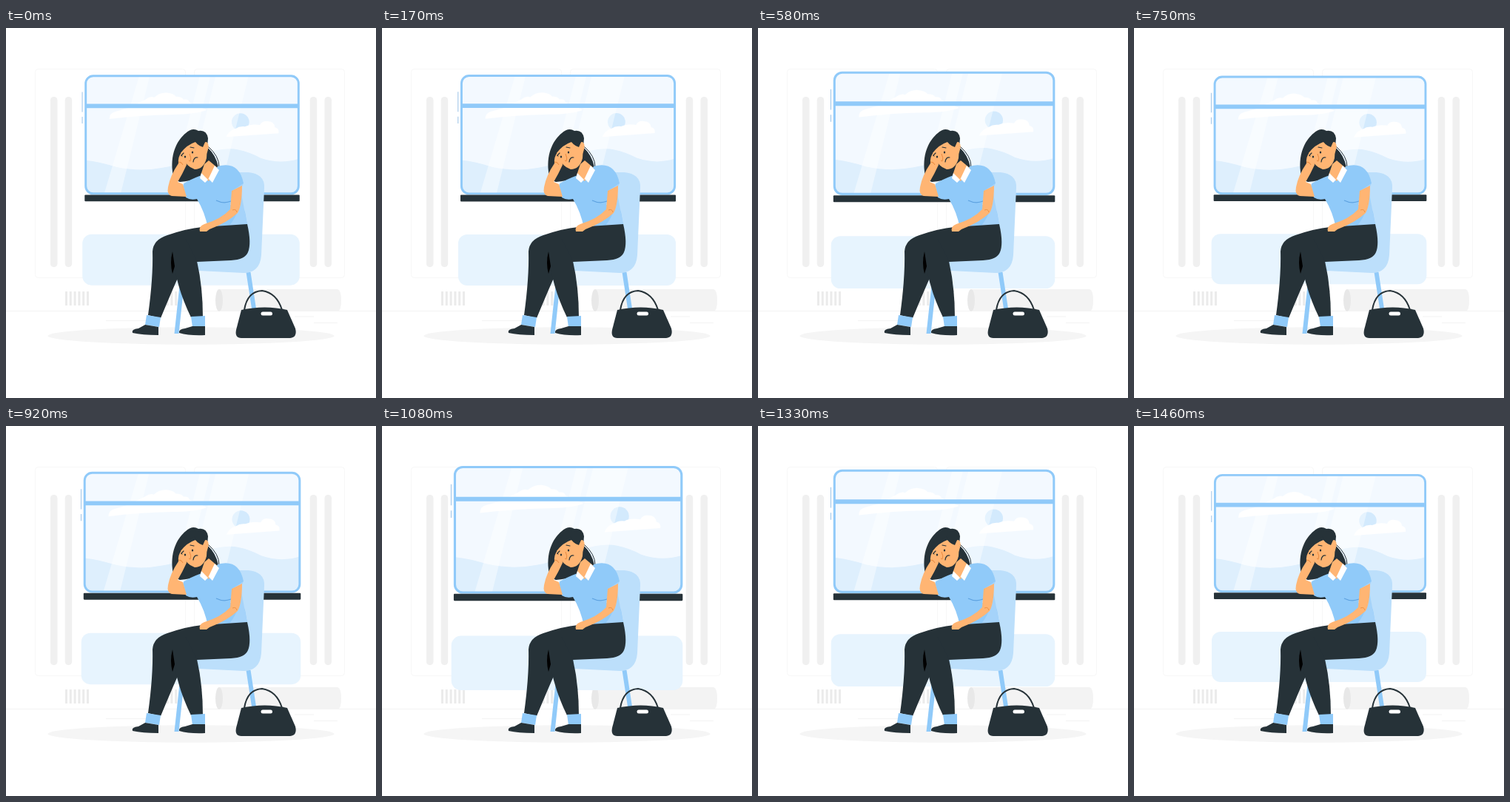
An HTML page for the animation above (1540 ms loop, 500x500 px).

```html
<!DOCTYPE html>
<html lang="en">
<head>
<meta charset="utf-8">
<title>Waiting on the train</title>
<style>
  html, body { margin: 0; width: 100%; height: 100%; overflow: hidden; background: #fff; }
  svg { display: block; width: 100%; height: 100%; }
  .blue { fill: #90caf9; }
  .dark { fill: #263238; }
  .skin { fill: #ffb573; }
  .white { fill: #fff; }
  .hill { fill: #deeffd; }
  .seat { fill: #bcdffb; }
  .line { fill: none; stroke: #263238; stroke-linecap: round; }
</style>
</head>
<body>
<svg viewBox="0 0 500 500">
  <defs>
    <clipPath id="pane"><rect x="109" y="66" width="285" height="158" rx="10"/></clipPath>
    <g id="vent" fill="#ebebeb">
      <path d="M0 0h3v19h-3zM5.8 0h3v19h-3zM11.6 0h3v19h-3zM17.4 0h3v19h-3zM23.2 0h3v19h-3zM29 0h3v19h-3z"/>
    </g>
    <rect id="rail" y="93" width="9.5" height="230" rx="4.5" fill="#f0f0f0"/>
  </defs>

  <!-- carriage -->
  <g fill="none" stroke="#f7f7f7">
    <rect x="39.5" y="55.5" width="203" height="282" rx="4"/>
    <rect x="254.5" y="55.5" width="203" height="282" rx="4"/>
  </g>
  <path d="M0 382.5H500M135 395.5H195M390 390H416M416 398.5H448" stroke="#f0f0f0" stroke-width=".8"/>
  <use href="#rail" x="60"/><use href="#rail" x="79.7"/>
  <use href="#rail" x="410.7"/><use href="#rail" x="430.5"/>
  <use href="#vent" x="80" y="356"/><use href="#vent" x="205" y="356"/>
  <path d="M288 353H448Q453 354 453 368T448 383H288Z" fill="#f3f3f3"/>
  <ellipse cx="288" cy="368" rx="5" ry="15" fill="#e8e8e8"/>
  <ellipse cx="250" cy="416" rx="193.5" ry="11.7" fill="#f5f5f5"/>

  <!-- window and bench -->
  <g id="pulse">
    <rect x="105" y="278" width="290" height="68" rx="12" fill="#e7f4fe"/>
    <g clip-path="url(#pane)">
      <path d="M109 66H394V224H109Z" fill="#f3f9ff"/>
      <circle cx="316" cy="128" r="11.7" fill="#d3eafd"/>
      <path class="hill" d="M109 179Q128 181 150 188Q182 195 212 189Q232 186 250 176Q292 160 313 165Q328 168 343 176Q369 185 394 177V224H109Z"/>
      <path class="white" d="M141 124Q141 116 149 114L167 109L189 98Q195 93 201 95Q209 88 218 89Q227 90 230 94Q238 94 240 98Q247 97 248 102L271 112Q255 118 225 118Q180 119 141 124Z"/>
      <path class="white" d="M297 148Q300 140 309 137Q315 133 322 134Q330 130 342 132Q345 126 352 127Q361 127 362 135Q368 136 367 143Z"/>
      <path d="M181 66H195L156 224H134ZM262 66H276L237 224H222ZM283 66H327L288 224H244Z" fill="#fff" opacity=".4"/>
      <path class="blue" d="M109 103.7H394V109.4H109Z"/>
    </g>
    <rect x="109.4" y="66.4" width="284.2" height="157.2" rx="10" fill="none" stroke="#90caf9" stroke-width="2.9"/>
    <rect class="dark" x="108" y="225.3" width="287" height="8.7" rx="1"/>
    <path d="M104.8 88V114.5M104.8 121V130" stroke="#9fc5e8"/>
  </g>

  <!-- chair -->
  <path class="blue" d="M238 316H244L233.5 413H227.5ZM324.500 330H330.500L338 379H332Z"/>
  <path class="seat" d="M289 195H327Q350 197 349 216L345 307Q343 331 321 331L260 328Q248 326 257 306L295 265Z"/>

  <!-- hair, neck, shirt -->
  <path class="dark" d="M225 194C222 167 233 150 243 142Q252 134 260 139Q271 137 273 149L272 161Q284 172 287 188L270 192Q263 206 235 208Q226 207 225 194Z"/>
  <path class="line" d="M273 160Q288 173 288 187" stroke-width="1"/>
  <path class="skin" d="M268 184L274 179L287 190L274 208L263 199Z"/>
  <path class="blue" d="M286 187Q315 179 321 210L307 220L303 239Q319 239 323 249L326 266L273 271Q269 249 258 231Q249 233 243 229L239 211Q248 205 264 199L274 207Z"/>
  <path d="M321 210L307 219L318 224L322 245L326 266L302 267Q319 245 318 216" fill="#a5d3fa"/>
  <path class="white" d="M264 196L262 203L269 209L274 204L279 209L288 192L282 186L273 205ZM232 207L240 210L239 213L233 211Z"/>
  <path d="M284 233Q294 238 304 234" fill="none" stroke="#5da2e0" stroke-width="1.2"/>

  <!-- face and supporting arm -->
  <path class="skin" d="M236 169Q244 158 256 154L264 158Q266 154 271 154Q275 157 273 164Q271 169 271 176Q267 191 255 191Q243 187 239 174Z"/>
  <path class="dark" d="M236 168Q241 158 254 150Q257 158 266 161L270 152L266 142L249 143Q237 153 234 168Z"/>
  <path class="line" d="M255 149Q257 156 263 159" stroke="#fff" stroke-width=".6"/>
  <path class="skin" d="M238 167Q232 174 233 183Q222 199 219 215Q217 225 224 227L244 228L239 211L232 208Q238 198 244 185Q244 178 240 176L242 174L236 173L240 169Z"/>
  <path class="line" d="M249 161L254 162M237 172L240 169M253 181Q254 174 259 175" stroke-width="1.2"/>
  <ellipse class="dark" cx="252" cy="168" rx="1.2" ry="1.6"/>
  <ellipse class="dark" cx="242" cy="174" rx="1.2" ry="1.6"/>
  <path d="M248 170Q251 176 249 180L247 179M233 181Q238 181 239 185" fill="none" stroke="#e9893e"/>

  <!-- legs and shoes -->
  <path class="dark" d="M326 265Q332 291 327 303Q323 313 304 314L258 316L240 320Q226 351 209 392L192 388Q199 337 198 302Q199 286 218 280Q244 271 265 269Z"/>
  <path class="dark" d="M225 304Q229 348 250 391H266Q266 350 258 315L243 285Z"/>
  <path d="M225 302Q221 317 225 332L228 322Z"/>
  <path class="blue" d="M190 388L209 391L207 404L188 401ZM250 390L269 389L269 403L252 404Z"/>
  <path class="dark" d="M188 401L206 404V415Q184 415 171 412Q169 407 179 406ZM252 403L269 403V415Q248 416 234 412Q233 407 242 406Z"/>

  <!-- resting arm -->
  <path class="skin" d="M305 220L319 213Q319 239 313 250Q299 263 275 272L271 275H262Q260 268 268 265Q291 258 303 245Z"/>
  <path d="M306 246Q311 244 312 249" fill="none" stroke="#e9893e" stroke-width=".8"/>

  <!-- bag -->
  <path class="line" d="M322 381Q326 356 346 355Q366 358 373 381" stroke-width="2"/>
  <path class="dark" d="M318 381Q350 374 380 381L391 406Q394 418 384 419H318Q309 419 311 408Z"/>
  <rect class="white" x="344.500" y="383.500" width="15.500" height="5" rx="2.500"/>
</svg>
<script>
  const LOOP = 1540, STEP = 1000 / 24, LAST = 35;
  // [step, growth]: two beats of the window
  const beats = [
    [0, .012], [1.2, 0], [4, .014], [9, .078], [10.5, .105], [14, .0435], [17.5, .002],
    [19.5, .004], [22, .0226], [26, .078], [27.6, .105], [32, .0435], [LAST, 0]
  ];
  const pulse = document.getElementById('pulse');

  function growth(step) {
    const i = Math.max(1, beats.findIndex(([s]) => s >= step));
    const [s0, g0] = beats[i - 1], [s1, g1] = beats[i];
    return g0 + (g1 - g0) * (step - s0) / (s1 - s0);
  }

  function draw() {
    const time = performance.now() % LOOP;
    const step = Math.min(LAST, Math.floor((time + 5) / STEP));
    pulse.setAttribute('transform', `translate(250 206) scale(${1 + growth(step)}) translate(-250 -206)`);
    requestAnimationFrame(draw);
  }
  draw();
</script>
</body>
</html>
```
